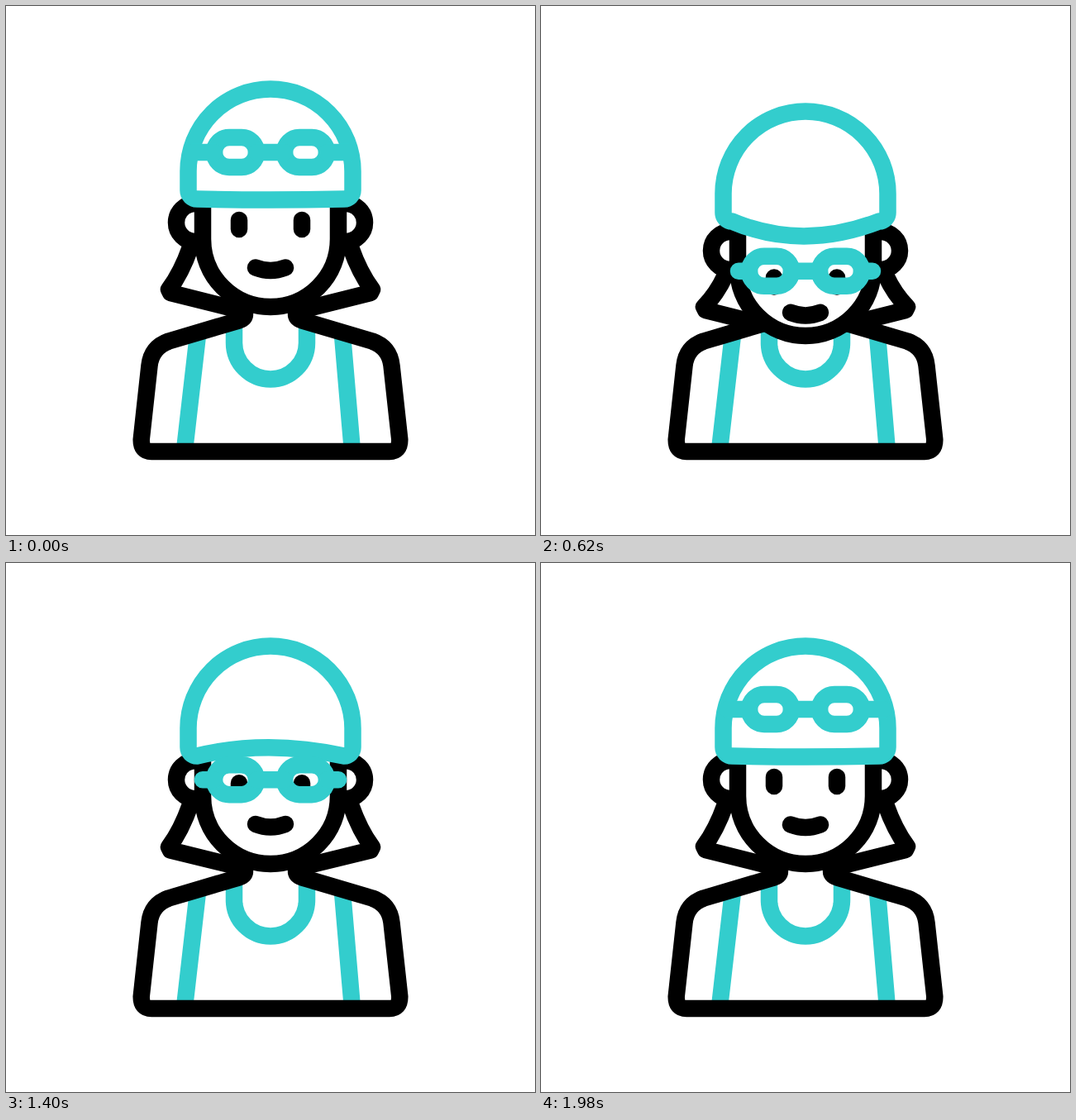
Recreate the animation shown at these times as an HTML page. Size 640 px wide and 640 px high, loop 2.4 s.

```html
<!DOCTYPE html>
<html lang="en">
<head>
<meta charset="utf-8">
<title>Swimmer</title>
<style>
  html, body { margin: 0; width: 100%; height: 100%; overflow: hidden; background: #fff; }
  svg { display: block; width: 100%; height: 100%; }
  path, circle, rect { fill: none; stroke: #000; stroke-width: 20.5; stroke-linecap: round; stroke-linejoin: round; }
  .teal { stroke: #33cdcd; }
  .solid { fill: #fff; }
</style>
</head>
<body>
<svg viewBox="0 0 640 640">
  <g id="side">
    <path id="hair"/>
    <circle id="ear" cx="229" r="23"/>
  </g>
  <use href="#side" transform="matrix(-1 0 0 1 640 0)"/>

  <path class="teal" d="M232 398L216.5 533M407 398L418.5 533M276 386V407.5A44 44 0 0 0 364 407.5V386"/>
  <path d="M289 372.500Q289 378 282 380.300L197 405.500Q176 413 173.500 435L163.700 524.500Q163.500 539 176 539H464Q476.500 539 476.300 524.500L466.500 435Q464 413 443 405.500L358 380.300Q351 378 351 372.500"/>

  <path id="face" class="solid"/>
  <path id="eyes" d="M282 259V270M358 259V270"/>
  <path id="mouth" d="M302 316.500Q320 323.500 338 316.500"/>
  <path id="cap" class="teal solid"/>
  <g id="goggles">
    <rect class="teal" x="252" y="-18" width="51" height="36" rx="18"/>
    <rect class="teal" x="337" y="-18" width="51" height="36" rx="18"/>
    <path id="strap" class="teal"/>
  </g>
</svg>
<script>
const LOOP = 2400, STEP = 20;
const $ = id => document.getElementById(id);
const draw = (id, d) => $(id).setAttribute('d', d);
const shift = (id, y) => $(id).setAttribute('transform', `translate(0 ${y})`);

// cap, brim bend, chin, ear, hair tip, hair end, eyes, mouth, goggles, strap half length
const rest = [0, 1, 0, 262, 344, 366, 0, 0, 177, 95];
const up   = [0, -27, 0, 276, 372, 372, -26, -26, 157.3, 88];
const down = [27, 18, 35, 296, 365, 387, 69.5, 54.5, 321, 81];
const worn = [0, -10, 0, 262, 344, 366, 8, 0, 264.3, 82];

const keys = [[0, rest], [313, up], [627, down], [940, worn], [1370, worn], [1700, up], [1980, rest], [LOOP, rest]];

function poseAt(t) {
  const i = keys.findIndex(k => t < k[0]);
  const [t0, a] = keys[i - 1], [t1, b] = keys[i];
  const s = (1 - Math.cos(Math.PI * (t - t0) / (t1 - t0))) / 2;
  return a.map((v, n) => v + (b[n] - v) * s);
}

function render(t) {
  const [cap, brim, chin, ear, tip, end, eyes, mouth, goggles, strap] = poseAt(t);
  const top = ear + 30;
  draw('hair', `M223 ${top}Q212 ${top + (tip - top) * 0.6} 197 ${tip - 1}L199 ${tip + 3}L275 ${end}`);
  $('ear').setAttribute('cy', ear);
  draw('face', `M238 ${220 + cap}V${282 + chin}A82 82 0 0 0 402 ${282 + chin}V${220 + cap}`);
  shift('eyes', eyes);
  shift('mouth', mouth);
  draw('cap', `M220.5 223V200A99.5 99.5 0 0 1 419.5 200V223A10.5 10.5 0 0 1 409 233.5Q316 ${233.5 + 2 * brim} 231 233.5A10.5 10.5 0 0 1 220.5 223Z`);
  shift('cap', cap);
  shift('goggles', goggles);
  draw('strap', `M${320 - strap} 0H252M303 0H337M388 0H${320 + strap}`);
}

const start = performance.now();
function tick() {
  const t = (performance.now() - start) % LOOP;
  render(Math.floor(t / STEP) * STEP);
  requestAnimationFrame(tick);
}
tick();
</script>
</body>
</html>
```
